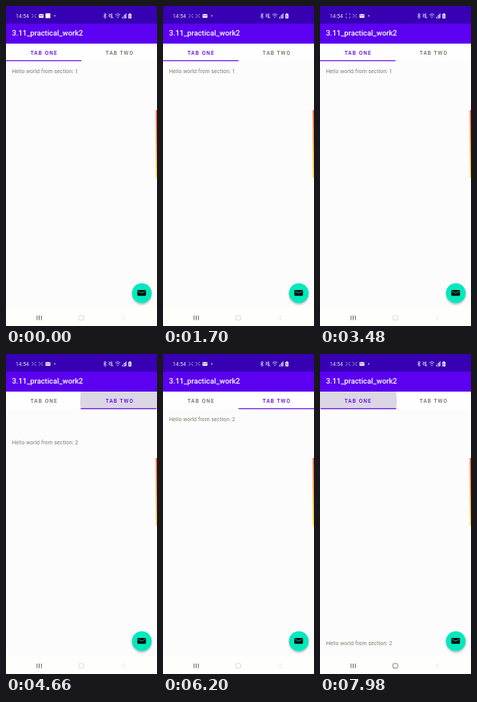
Write an HTML page that moves like this. It is 189 px wide and 400 px high and loops after 8 s.

```html
<!DOCTYPE html>
<html lang="en">
<head>
<meta charset="utf-8">
<title>Tabs demo</title>
<style>
  html, body { margin: 0; width: 100%; height: 100%; overflow: hidden; background: #fcfcfd; }
  svg { display: block; width: 100%; height: 100%; }
  text { font-family: Roboto, sans-serif; }
  .tab { font-size: 6.5px; font-weight: 500; letter-spacing: 1.08px; text-anchor: middle; }
  .page { font-size: 6.6px; letter-spacing: .15px; fill: #7b7b6c; }
</style>
</head>
<body>
<svg viewBox="0 0 189 400" preserveAspectRatio="none">
  <defs>
    <clipPath id="pageClip"><rect y="69" width="189" height="308"/></clipPath>
    <clipPath id="tabClip"><rect y="47" width="189" height="22"/></clipPath>
    <linearGradient id="edge" x2="0" y2="1">
      <stop stop-color="#ff5a2c"/><stop offset=".5" stop-color="#ff9a30"/><stop offset="1" stop-color="#ffe040"/>
    </linearGradient>
    <filter id="soft" x="-50%" y="-50%" width="200%" height="200%"><feGaussianBlur stdDeviation="1.3"/></filter>
    <g id="mail">
      <rect x="-3" y="-2.4" width="6" height="4.8" rx=".5" fill="#fff"/>
      <path d="M-2.6-1.7 0 .4 2.6-1.7" fill="none" stroke="#3700b3" stroke-width=".8"/>
    </g>
    <path id="cross" d="M-2.6-2.3-1 -.7M2.6-2.3 1-.7M-2.6 2.3-1 .7M2.6 2.3 1 .7M-.4 0H.4" fill="none" stroke="#d9cff5" stroke-width=".8"/>
    <path id="frame" d="M-2.5-1V-2.5H-1M1-2.5H2.5V-1M2.5 1V2.5H1M-1 2.5H-2.5V1" fill="none" stroke="#b9a6ea" stroke-width=".7"/>
  </defs>

  <rect width="189" height="400" fill="#fcfcfd"/>
  <g clip-path="url(#pageClip)">
    <text id="page1" class="page" x="7.5">Hello world from section: 1</text>
    <text id="page2" class="page" x="7.5">Hello world from section: 2</text>
  </g>

  <rect y="47" width="189" height="22" fill="#fefefe"/>
  <g clip-path="url(#tabClip)"><circle id="ripple" cy="58" fill="#5c4a88"/></g>
  <text id="tab1" class="tab" x="47.7" y="60.8">TAB ONE</text>
  <text id="tab2" class="tab" x="142.4" y="60.8">TAB TWO</text>
  <rect id="bar" y="67.8" width="94.5" height="1.1" fill="#6200ee"/>

  <rect width="189" height="23" fill="#3700b3"/>
  <rect y="22" width="189" height="25" fill="#5b00f0"/>
  <text x="7.5" y="36.9" font-size="9.35" font-weight="500" fill="#fff">3.11_practical_work2</text>

  <text x="12" y="14.8" font-size="6.8" fill="#ddd6f6">14:54</text>
  <g id="early">
    <use href="#cross" x="35" y="12.3"/><use href="#mail" x="44" y="12.3"/>
    <rect x="49.5" y="9.2" width="6" height="6" fill="#fff"/>
  </g>
  <g id="late">
    <use id="blinkA" href="#cross" x="35" y="12.3"/><use id="blinkB" href="#frame" x="35" y="12.3"/>
    <use href="#cross" x="43.5" y="12.3"/><use href="#mail" x="52.5" y="12.3"/>
  </g>
  <circle cx="61" cy="12.3" r=".8" fill="#fff"/>
  <g fill="none" stroke="#e4dcfa" stroke-width=".75">
    <path d="M122 10.7 125.6 13.9 123.8 15.5V9.1L125.6 10.7 122 13.9"/>
    <path d="M129 11.2H130.4L132.4 9.5V15.1L130.4 13.4H129ZM128.8 9.3 134.3 15.3"/>
    <path d="M136.8 11Q140 8.2 143.2 11M138 12.6Q140 10.9 142 12.6M139.2 14.2 140 14.9 140.8 14.2"/>
    <path d="M145.2 15H150.3V9.5Z"/>
    <path d="M149 15V11.2" stroke-width="1.5"/>
  </g>
  <path d="M153.2 9.9H154.2V9.2H156V9.9H157V15.4H153.2Z" fill="#f0ebfc"/>
  <path d="M155.4 10.9 154.4 12.9H155.8L155 14.5" fill="none" stroke="#3700b3" stroke-width=".5"/>

  <rect x="187.5" y="130" width="1.5" height="85" fill="url(#edge)"/>

  <circle cx="170" cy="361" r="12.4" fill="#000" opacity=".22" filter="url(#soft)"/>
  <circle cx="170" cy="359" r="12.4" fill="#03e8bd"/>
  <rect x="164.4" y="355" width="10.8" height="7.2" rx=".9" fill="#050505"/>
  <path d="M165.4 356.5 169.8 359 174.2 356.5" fill="none" stroke="#03e8bd" stroke-width=".8"/>

  <rect y="377" width="189" height="23" fill="#fefefa"/>
  <path d="M38.9 387V392.6M41.6 387V392.6M44.3 387V392.6" stroke="#666" stroke-width="1"/>
  <rect id="home" x="91.2" y="386.9" width="6.2" height="5.8" rx="1.8" fill="none" stroke="#666" stroke-width=".9"/>
  <path d="M148.6 386.8 145.6 389.8 148.6 392.8" fill="none" stroke="#666" stroke-width=".9" opacity=".2"/>

  <circle id="dot" r="4.6" cy="61" fill="#fff" fill-opacity=".85" stroke="#c9c9c9" stroke-width=".6"/>
</svg>
<script>
const LOOP = 8000, TRAVEL = 309, TEXT_Y = 83.7, TAB = 94.5;
const el = id => document.getElementById(id);
const set = (id, attrs) => { for (const k in attrs) el(id).setAttribute(k, attrs[k]); };
const show = (id, on) => set(id, { opacity: on ? 1 : 0 });
const clamp = v => Math.min(1, Math.max(0, v));
const ramp = (t, start, length) => clamp((t - start) / length);
const decelerate = p => 1 - (1 - p) ** 5;

const taps = [
  { tab: 1, down: 4300, up: 4510, x: 148 },
  { tab: 0, down: 6860, up: 7830, x: 66 }
];

// Position between the tabs, 0 to 1.
const slide = (t, length) => taps.reduce(
  (pos, tap) => pos + (tap.tab - pos) * decelerate(ramp(t, tap.up, length)), 0);

function draw(t) {
  const page = slide(t, 400);
  const second = t >= taps[0].up && t < taps[1].up;
  set('page1', { y: TEXT_Y - page * TRAVEL });
  set('page2', { y: TEXT_Y + (1 - page) * TRAVEL });
  set('bar', { x: TAB * slide(t, 250) });
  set('tab1', { fill: second ? '#6c6c60' : '#6200ee' });
  set('tab2', { fill: second ? '#6200ee' : '#6c6c60' });

  const tap = taps[t < 6000 ? 0 : 1];
  const grow = ramp(t, tap.up - 110, 225);
  const fade = 1 - ramp(t, tap.up + 170, 350);
  set('ripple', { cx: TAB * (tap.tab + .5), r: 49 * grow, opacity: .22 * fade });
  set('dot', { cx: tap.x });
  show('dot', t >= tap.down && t < tap.up + 40);

  const early = t < 820, framed = t % 1710 < 340;
  show('early', early);
  show('late', !early);
  show('blinkA', !framed);
  show('blinkB', framed);
  set('home', { opacity: t < 7560 ? .25 : .9 });
}

const start = performance.now();
function tick() {
  draw((performance.now() - start) % LOOP);
  requestAnimationFrame(tick);
}
draw(0);
requestAnimationFrame(tick);
</script>
</body>
</html>
```
